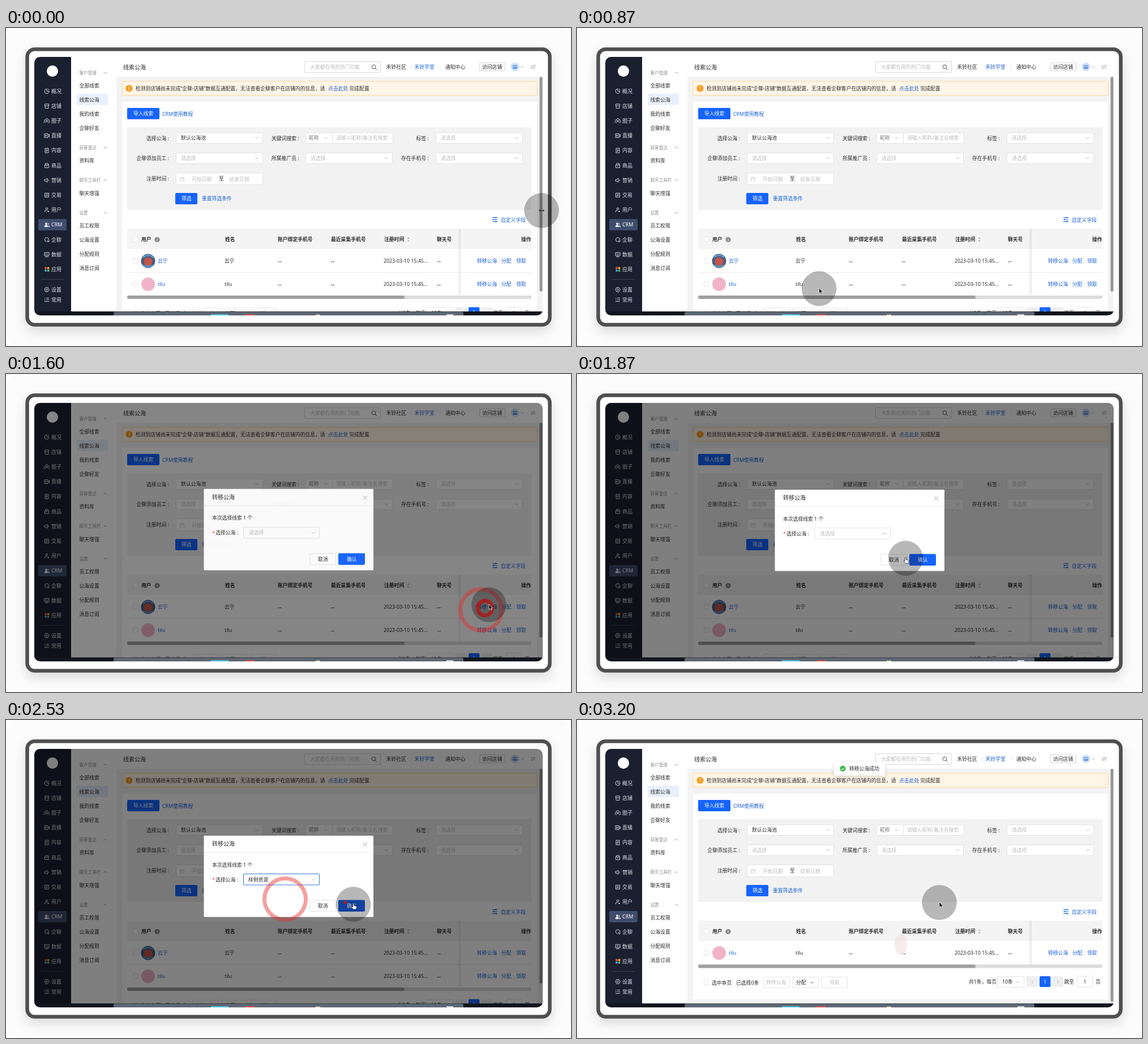
Animation, 998 px wide and 561 px high, one loop 3270 ms. Source, as an HTML page:

```html
<!DOCTYPE html>
<html lang="zh-CN">
<head>
<meta charset="utf-8">
<title>线索公海</title>
<style>
html, body { margin: 0; width: 100%; height: 100%; overflow: hidden; background: #fff; }
svg { display: block; width: 998px; height: 561px; }
text { font-family: "Noto Sans", "Noto Sans CJK SC", "Noto Sans CJK", sans-serif; white-space: pre; }
</style>
</head>
<body>
<svg id="stage" viewBox="0 0 998 561" xmlns="http://www.w3.org/2000/svg"></svg>
<script>
const BLUE = '#1664ff', LINK = '#1a62d6', INK = '#2b2b2b', PALE = '#bdbdbd', LINE = '#dedede';
const LOOP = 3270, STEP = 200 / 3, FRAMES = 49;

// ---- drawing helpers; text is placed by its vertical centre ----
const text = (x, y, str, fill = INK, size = 8.8, weight = 400) =>
  `<text x="${x}" y="${y + size * 0.36}" fill="${fill}" font-size="${size}" font-weight="${weight}">${str}</text>`;
const label = (x, y, str) => text(x, y, str + ' :');
const rect = (x, y, w, h, fill, extra = '') =>
  `<rect x="${x}" y="${y}" width="${w}" height="${h}" fill="${fill}" ${extra}/>`;
const box = (x, y, w, h, fill = '#fff', stroke = LINE) =>
  rect(x + 0.5, y + 0.5, w - 1, h - 1, fill, `stroke="${stroke}" stroke-width=".8" rx="1.5"`);
const line = (d, stroke, width = 1, extra = '') =>
  `<path d="${d}" fill="none" stroke="${stroke}" stroke-width="${width}" ${extra}/>`;
const circle = (x, y, r, fill, extra = '') => `<circle cx="${x}" cy="${y}" r="${r}" fill="${fill}" ${extra}/>`;
const group = (id, body, extra = '') => `<g id="${id}" ${extra}>${body}</g>`;
const down = (x, y, c = '#b5b5b5') => line(`M${x - 3} ${y - 1.5}l3 3 3-3`, c, 0.9);
const up = (x, y) => line(`M${x - 3} ${y + 1.5}l3-3 3 3`, '#999', 0.9);
const check = y => box(224, y - 5, 9.5, 9.5);
const button = (x, y, w, h, str, textX, id = '') =>
  rect(x, y, w, h, BLUE, `rx="2" ${id && `id="${id}"`}`) + text(textX, y + h / 2, str, '#fff', 8.8, 500);

function frame() {
  return rect(0, 0, 998, 561, '#fcfcfc', 'rx="22"') +
    rect(37.5, 37.5, 923, 486, '#fff', 'rx="13" stroke="#505050" stroke-width="6.5" filter="url(#frameShadow)"');
}

function sidebar() {
  const icons = {
    概况: 'M4 0a4 4 0 1 0 4 4H4zM5.5-.3A4 4 0 0 1 8 2.5',
    店铺: 'M1 3.5V8h6V3.5M.5.5h7v3h-7z',
    圈子: 'M4 0a2 2 0 1 1 0 4 2 2 0 0 1 0-4M1 8c0-4 6-4 6 0M1 1.5C-1 3 0 4 .5 4-1 5-1 6-1 7M7 1.5C9 3 8 4 7.5 4 9 5 9 6 9 7',
    直播: 'M0 .5h6v7H0zM6 3l2.5-1v4L6 5M2 2.5v3L4 4z',
    内容: 'M1 0h6v8H1zM2.5 2.5h3M2.5 4h3M2.5 5.7h2',
    商品: 'M.5 3h7v5h-7zM1 3l.7-2.5h4.6L7 3M3 5h2',
    营销: 'M0 2.5h2L5 .5v7l-3-2H0zM6.5 2.5q1.5 1.5 0 3',
    交易: 'M.5.5h7v7h-7zM2.2 3h3.6l-1-1M5.8 5H2.2l1 1',
    用户: 'M4 .2a1.8 1.8 0 1 1 0 3.6 1.8 1.8 0 0 1 0-3.6M0 8q0-3.5 3.5-3.5M5 6.5h3M6.5 5v3',
    CRM: 'M3 .5a1.6 1.6 0 1 1 0 3.2 1.6 1.6 0 0 1 0-3.2M0 7.5Q0 4.5 3 4.5T6 7.5zM6 1q2 1 0 3M7 5q1.5.7 1.5 2.5H7',
    企聊: 'M4 7.5A3.6 3.6 0 1 1 7.6 4L8 7.7H5.5V5',
    数据: 'M0 .5h8v5.5H0zM1.5 4l1.5-1.5 2 1.5 1.5-1.5M1 8h6',
    应用: '',
    设置: 'M2 .2h4L8.2 4 6 7.8H2L-.2 4zM4 2.5a1.5 1.5 0 1 1 0 3 1.5 1.5 0 0 1 0-3',
    常用: 'M0 1h1.5M3 1h5M0 4h1.5M3 4h5M0 7h8'
  };
  let s = rect(50, 51, 65, 449, '#1a2030') + circle(82, 76, 10, '#fff') +
    rect(57, 337, 50, 20, '#3f4d6d', 'rx="2"') + line('M62 443.5h40', '#3a4052');
  Object.entries(icons).forEach(([name, d], i) => {
    const y = i < 13 ? 111.4 + i * 26.2 : 461.5 + (i - 13) * 18;
    const active = name === 'CRM';
    s += line(d, '#e3e5ea', 0.9, `transform="translate(68 ${y - 4})" ${active ? 'style="fill:#fff"' : ''}`) +
      text(80, y, name, active ? '#fff' : '#dfe1e6', 9);
  });
  ['#ef5350', '#ffb300', '#42a5f5', '#66bb6a'].forEach((c, i) =>
    s += circle(70 + (i % 2) * 4.6, 423.5 + (i >> 1) * 4.6, 2, c));
  return s;
}

function menu() {
  const sections = [
    [79, '客户管理', 102, ['全部线索', '线索公海', '我的线索', '企聊好友']],
    [211, '获客雷达', 234, ['资料库']],
    [268.5, '聊天工具栏', 291.5, ['聊天增强']],
    [326, '设置', 349, ['员工权限', '公海设置', '分配规则', '消息订阅']]
  ];
  return rect(115, 51, 80, 449, '#fff') + rect(125, 116, 55, 20, '#e8f0fe', 'rx="1"') +
    sections.map(([y, title, top, items]) => text(129.5, y, title, '#8d8d8d', 7.6) + up(175.5, y) +
      items.map((item, i) => text(129.5, top + i * 25, item)).join('')).join('');
}

function header() {
  return rect(195, 51, 753, 35, '#fff') + text(207, 69.5, '线索公海', INK, 10, 500) +
    box(527, 59, 135, 20, '#fff', '#cfcfcf') + text(537, 69, '大家都在用的热门功能', PALE) +
    line('M649.5 65a3.4 3.4 0 1 1 0 6.8 3.4 3.4 0 0 1 0-6.8M652 71l3 3', '#555') +
    text(671.5, 69, '禾铃社区') + text(721.5, 69, '禾铃学堂', LINK, 8.8, 500) + text(776, 69, '通知中心') +
    line('M715.5 65v8M766.5 65v8', '#e2e2e2', 0.8) +
    box(836, 61, 46, 15, '#fff', '#c9c9c9') + text(841, 69, '访问店铺', INK, 8.8, 500) +
    circle(899, 68.5, 7.5, '#cfe0f8') + rect(895, 65.5, 8, 6.5, '#5f96e6', 'rx="1"') + rect(895, 67.5, 8, 1, '#fff') +
    down(912, 68.5) + line('M927 67h8l-2.5-2.5M935 70h-8l2.5 2.5', '#888', 0.8);
}

function alertBar() {
  return box(204.5, 93.5, 734, 26, '#fff5e6', '#ffce85') +
    circle(217.5, 106.5, 6, '#fa9a1b') + line('M217.5 103v4.5M217.5 108.8v1.4', '#fff', 1.2) +
    text(229, 106.8, '检测到店铺尚未完成“企聊-店铺”数据互通配置，无法查看企聊客户在店铺内的信息，请') +
    text(569, 106.8, '点击此处', LINK) + text(606.5, 106.8, '完成配置');
}

function filters() {
  const select = (x, y, str, fill = PALE, w = 154) =>
    box(x, y - 9.5, w, 19.5) + text(x + 9, y, str, fill) + down(x + w - 11, y);
  return button(214, 141, 57, 20, '导入线索', 225) + text(276, 151.5, 'CRM使用教程', LINK) +
    rect(214, 175, 714, 146, '#f2f2f2') +
    label(248, 194.5, '选择公海') + select(300, 194, '默认公海池', INK) +
    label(469, 194.5, '关键词搜索') + box(529, 184.5, 48, 19.5) + text(535, 194, '昵称', '#777') + down(565, 194) +
    box(576, 184.5, 108, 19.5) + text(583, 194, '请输入昵称/备注名搜索', PALE) +
    label(724.5, 194.5, '标签') + select(759, 194, '请选择') +
    label(230.5, 230, '企聊添加员工') + select(300, 229.5, '请选择') +
    label(469, 230, '所属推广员') + select(529, 229.5, '请选择') +
    label(698, 230, '存在手机号') + select(759, 229.5, '请选择') +
    label(248, 266, '注册时间') + box(300, 255, 154, 22) +
    line('M307.5 264h7v6h-7zM307.5 266h7M309.5 262.5v2M312.5 262.5v2', '#c4c4c4', 0.7) +
    text(328, 266.5, '开始日期', PALE) + text(376, 266, '至') + text(394.5, 266.5, '结束日期', PALE) +
    button(299, 291, 39, 20, '筛选', 310) + text(346, 301, '重置筛选条件', LINK) +
    line('M859 334.5h9M859 338h9M859 341.5h9M865 333v3M861.5 336.5v3M865.5 340v3', LINK, 1) +
    text(874, 338.5, '自定义字段', LINK);
}

function row(id, y, name, avatar) {
  return group(id, check(y) + avatar + text(268, y, name, LINK) + text(386, y, name) +
    text(480, y, '--', INK, 11) + text(573.5, y, '--', INK, 11) + text(667, y, '2023-03-10 15:45...') +
    text(761, y, '--', INK, 11) +
    text(832, y, '转移公海', LINK) + text(875, y, '分配', LINK) + text(901, y, '领取', LINK) +
    line(`M871.5 ${y - 4}v8M897.5 ${y - 4}v8`, '#e4e4e4', 0.8) +
    line(`M214 ${y + 20.5}h714`, '#ececec'));
}

function table() {
  const head = [[239, '用户'], [387, '姓名'], [480, '账户绑定手机号'], [574, '最近采集手机号'],
    [668, '注册时间'], [761, '聊天号'], [910, '操作']];
  const picture = circle(251, 411, 12.5, '#4d5a80') + circle(251, 412, 7.5, '#c4564a') +
    line('M242 405q9-8 18 0M242 418q9 6 18 0', '#5b9bd0', 2.5);
  return rect(214, 354, 714, 36, '#f4f4f4') + check(373) +
    head.map(([x, title]) => text(x, 373, title, INK, 8.8, 600)).join('') +
    circle(267, 373.3, 4.6, '#8a8a8a') + line('M267 372.5v3M267 370.3v1.2', '#fff', 1) +
    `<path d="M708.5 372l2.3-3 2.3 3zM708.5 374.5l2.3 3 2.3-3z" fill="#b8b8b8"/>` +
    row('rowOne', 411, '云宁', picture) + row('rowTwo', 452, 'tilu', circle(251, 452, 12, '#f2b3c8')) +
    rect(797, 354, 6, 77, 'url(#edge)') + rect(797, 431, 6, 40, 'url(#edge)', 'id="edgeTwo"');
}

function pager() {
  const small = (x, str, fill, textX) => box(x, 453, 47, 20) + text(textX, 463, str, fill);
  return rect(214, 431.5, 714, 6, '#dcdcdc', 'rx="3"') + rect(214, 431.5, 490, 6, '#a0a0a0', 'rx="3"') +
    check(463.5) + text(238, 463.5, '选中本页') + text(281, 463.5, '已选择0条') +
    small(329, '转移公海', PALE, 334) + small(380, '分配', INK, 387) + down(415, 463, '#555') + small(431, '领取', PALE, 446) +
    `<text id="total" x="692" y="465" font-size="8.8" fill="${INK}"></text>` +
    box(742, 452, 48, 20) + text(751, 462, '10条') + down(778, 462) +
    rect(794, 452, 20, 19, '#efefef', 'rx="2"') + line('M805.5 459l-2.5 3 2.5 3', '#bbb', 0.9) +
    button(817, 452, 19.5, 19, '1', 824.3) +
    rect(839, 452, 20, 19, '#efefef', 'rx="2"') + line('M848 459l2.5 3-2.5 3', '#bbb', 0.9) +
    text(860.5, 462, '跳至') + box(883, 451.5, 28, 20) + text(894.5, 462, '1') + text(916, 462, '页');
}

function dock() {
  return rect(50, 500, 898, 8, '#10161f') + rect(190, 500.5, 618, 8, '#5e6874', 'rx="3"') +
    rect(362, 505, 31, 3, '#4fc7dd') + rect(423, 505, 16, 3, '#d9534a') +
    rect(547, 505.5, 8, 2, '#d8cfae') + rect(778, 505, 12, 2, '#d5dae0');
}

function dialog() {
  return rect(349.5, 204, 299.5, 143.5, '#fff', 'rx="1.5"') +
    text(364, 218.5, '转移公海', INK, 10, 500) + line('M631 216l7 7M638 216l-7 7', '#999', 0.9) +
    line('M349.5 233.5h299.5', '#ebebeb') + text(364, 255.5, '本次选择线索 1 个') +
    text(364, 282, '*', '#f5483b') + label(370, 281.5, '选择公海') +
    `<rect id="field" x="419.5" y="271.5" width="134" height="19.5" rx="1.5" fill="#fff"/>` +
    group('hint', text(429, 281.5, '请选择', PALE)) + group('value', text(428, 281.5, '样例资源')) + down(543, 281.5) +
    box(536, 317.5, 47, 20.5) + text(551, 328, '取消') + button(587, 317.5, 47, 20.5, '确认', 602, 'confirm') +
    group('options', rect(419, 294, 135, 25, '#fff', 'rx="2" filter="url(#softShadow)"') +
      rect(419, 296.5, 135, 20, '#f3f5f8') + text(428, 306.5, '样例资源'));
}

function overlays() {
  return rect(50, 51, 898, 449, '#000', 'id="mask"') + group('dialog', dialog()) +
    group('tooltip', rect(659, 402.5, 99, 24.5, '#fff', 'rx="2" filter="url(#softShadow)"') +
      text(665.5, 414.5, '2023–03–10 15:45:16', INK, 8.5)) +
    group('spinner', '<ellipse cx="572" cy="396" rx="11" ry="18" fill="#efdedb"/>') +
    group('toast', rect(454, 74, 90, 24, '#fff', 'rx="2" filter="url(#softShadow)"') +
      circle(469.5, 85.8, 5, '#35b544') + line('M467 86l1.8 1.8 3.2-3.6', '#fff', 1.1) + text(481, 86, '转移公海成功'));
}

function pointer() {
  const shape = (id, d, fill = '#111') => `<path id="${id}" d="${d}" fill="${fill}" stroke="${fill === '#111' ? '#fff' : '#111'}" stroke-width=".7"/>`;
  return circle(0, 0, 30.8, '#000', 'fill-opacity=".28"') +
    shape('arrow', 'M0-1V8.5L2.2 6.6 3.8 9.8 5.2 9 3.8 6H6.5Z') +
    shape('hand', 'M-1-1q1.2-1.2 2 0v3.5l4 1q1 .4.8 2L5 9H0L-3.5 5q0-1.5 2.5-.2z', '#fff') +
    line('M-2-5h1.5L0-4.2.5-5H2M0-4.5V4.5M-2 5h1.5L0 4.2.5 5H2', '#222', 0.8, 'id="beam"') +
    line('M-4 0h8M-2.5-2L-4.5 0l2 2M2.5-2l2 2-2 2', '#222', 1, 'id="resize"');
}

document.getElementById('stage').innerHTML = `<defs>
  <filter id="frameShadow" x="-10%" y="-10%" width="120%" height="125%"><feDropShadow dx="0" dy="9" stdDeviation="10" flood-opacity=".13"/></filter>
  <filter id="softShadow" x="-20%" y="-40%" width="140%" height="190%"><feDropShadow dx="0" dy="2" stdDeviation="3.5" flood-opacity=".14"/></filter>
  <linearGradient id="edge"><stop offset="0" stop-opacity="0"/><stop offset="1" stop-opacity=".09"/></linearGradient>
  <clipPath id="screen"><rect x="50" y="51" width="898" height="456" rx="10"/></clipPath>
  <clipPath id="page"><rect x="50" y="51" width="898" height="449"/></clipPath></defs>` +
  frame() + group('window', dock() + group('content',
    rect(195, 51, 753, 449, '#f3f3f3') + rect(205, 130, 733, 363, '#fff', 'id="card"') + sidebar() + menu() + header() + alertBar() +
    filters() + table() + group('pager', pager()) + rect(942.5, 86, 5, 379, '#979797', 'id="bar" rx="2.5"'),
    'clip-path="url(#page)"') + overlays(), 'clip-path="url(#screen)"') +
  group('ripples', '') + group('pointer', pointer());

// ---- motion ----
const el = {};
document.querySelectorAll('[id]').forEach(node => el[node.id] = node);
const set = (id, attrs) => Object.entries(attrs).forEach(([k, v]) => el[id].setAttribute(k, v));
const fade = (id, v) => set(id, { opacity: v, visibility: v > 0 ? 'visible' : 'hidden' });
const ramp = (t, from, to) => Math.min(1, Math.max(0, (t - from) / (to - from)));
const easeOut = p => 1 - (1 - p) ** 2;

const path = [[0, 946, 322], [120, 918, 317], [300, 800, 385], [467, 722, 449], [533, 700, 458], [700, 540, 484], [900, 405, 455],
  [1000, 389, 447], [1050, 389, 447], [1200, 834, 421], [1327, 839, 416], [1488, 846, 413], [1600, 853, 407],
  [1667, 830, 396], [1867, 580, 325], [2030, 500, 284], [2133, 488, 278], [2200, 487, 263], [2265, 493, 316],
  [2467, 598, 322], [2533, 613.5, 325], [2660, 629, 334], [2900, 634, 329], [3200, 640, 322]];
const clicks = [[1025, 389, 447], [1327, 839, 416], [1488, 846, 413], [2125, 488, 279], [2260, 493, 316], [2513, 599, 322]];

function pointerAt(t) {
  const i = Math.max(1, path.findIndex(p => p[0] >= t));
  const [t0, x0, y0] = path[i - 1], [t1, x1, y1] = path[i];
  const p = ramp(t, t0, t1);
  return [x0 + (x1 - x0) * p, y0 + (y1 - y0) * p];
}

function ripple(t, [start, x, y]) {
  const p = (t - start) / 280;
  if (p < 0 || p > 1.06) return '';
  const outer = Math.max(2, 41 * p), width = Math.min(7, outer);
  return circle(x, y, outer - width / 2, 'none', `stroke="#e52b2b" stroke-width="${width}" opacity="${1 - 0.58 * p * p}"`);
}

function render(t) {
  set('pointer', { transform: `translate(${pointerAt(t).join(' ')})` });
  const kind = t < 100 ? 'resize' : t > 430 && t < 560 ? 'beam' : t > 1820 && t < 2750 ? 'hand' : 'arrow';
  ['resize', 'beam', 'hand', 'arrow'].forEach(k => fade(k, +(k === kind)));
  el.ripples.innerHTML = clicks.map(c => ripple(t, c)).join('');

  fade('tooltip', ramp(t, 380, 450) * (1 - ramp(t, 560, 680)));
  const entered = easeOut(ramp(t, 1400, 1650)), left = ramp(t, 2690, 2870);
  fade('mask', 0.5 * entered * (1 - left));
  fade('dialog', entered * (1 - left));
  set('dialog', { transform: `translate(0 ${-30 * (1 - entered) - 12 * left})` });

  const chosen = t >= 2300;
  fade('hint', +!chosen);
  fade('value', +chosen);
  fade('options', ramp(t, 2140, 2200) * (1 - ramp(t, 2300, 2400)));
  set('field', t >= 2130 ? { stroke: '#3a7bd5', 'stroke-width': 1.1 } : { stroke: LINE, 'stroke-width': 0.8 });
  set('confirm', { fill: t > 2440 ? '#195cdc' : BLUE });

  const moved = t >= 3090;
  fade('spinner', ramp(t, 2870, 2930) * (1 - 0.4 * ramp(t, 3100, 3200)));
  const toast = easeOut(ramp(t, 2780, 2920));
  fade('toast', toast);
  set('toast', { transform: `translate(0 ${-20 * (1 - toast)})` });
  fade('rowOne', +!moved);
  fade('edgeTwo', +!moved);
  set('rowTwo', { transform: `translate(0 ${moved ? -41 : 0})` });
  set('pager', { transform: `translate(0 ${moved ? 0 : 40.5})` });
  set('card', { height: moved ? 363 : 380 });
  set('bar', { height: moved ? 411 : 379 });
  el.total.textContent = `共${moved ? 1 : 2}条，每页`;
}

const begin = performance.now();
function tick() {
  const now = (performance.now() - begin) % LOOP;
  render(Math.floor((now + 4) / STEP) % FRAMES * STEP);
  requestAnimationFrame(tick);
}
tick();
</script>
</body>
</html>
```
